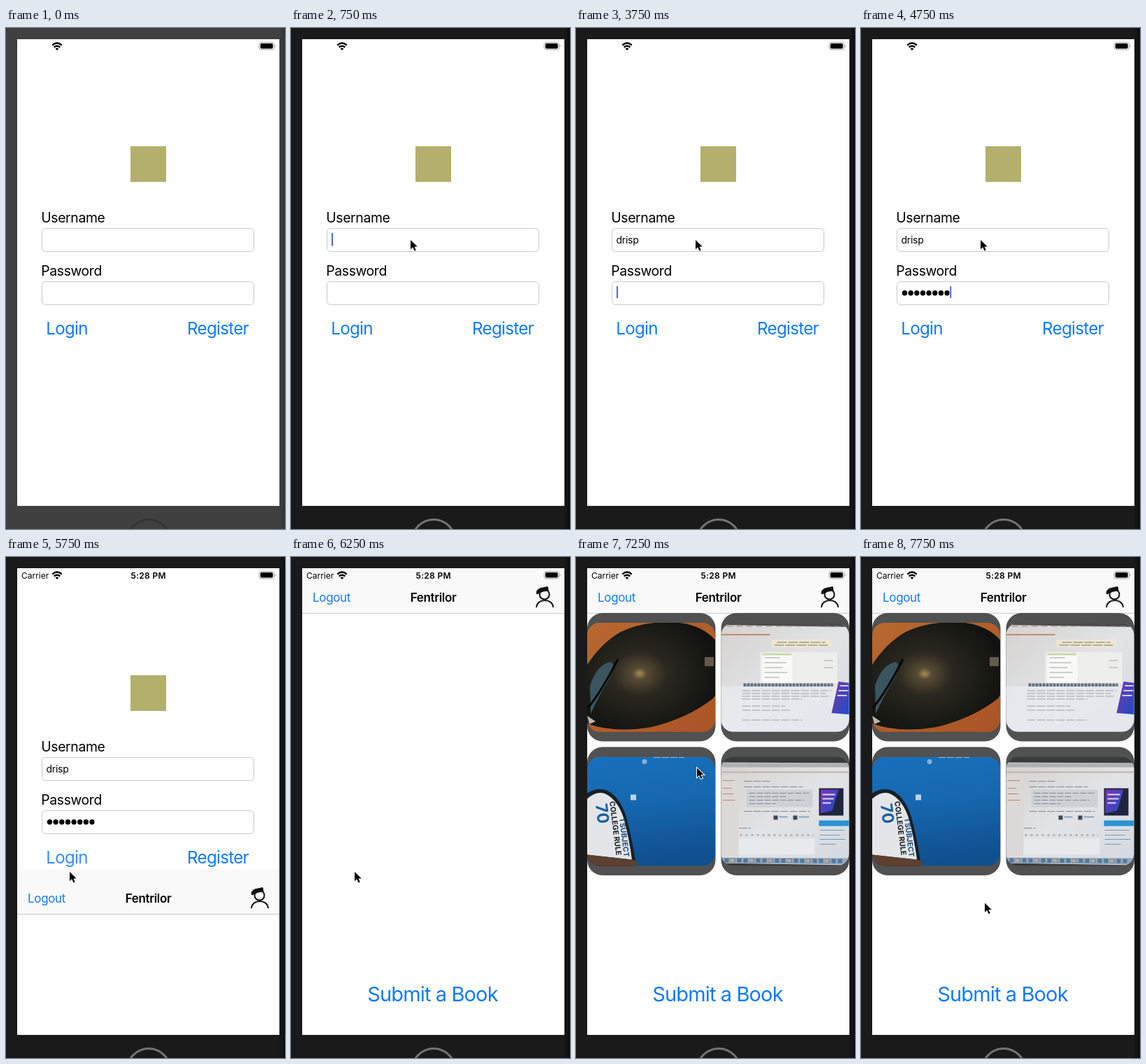
These frames come from a looping animation (399x716 px, 8000 ms). An HTML page:

```html
<!DOCTYPE html>
<html lang="en">
<head>
<meta charset="utf-8">
<title>Login flow</title>
<style>
html, body { margin: 0; width: 100%; height: 100%; overflow: hidden; background: #1a1a1a; }
svg { display: block; width: 399px; height: 716px; font-family: Inter, Roboto, sans-serif; }
.label { font-size: 19.4px; letter-spacing: -.02em; }
.button { font-size: 24.2px; letter-spacing: -.03em; fill: #0f7afc; text-anchor: middle; }
.submit { font-size: 29px; }
.nav { font-size: 17px; letter-spacing: -.02em; }
.center { text-anchor: middle; font-weight: 600; }
.small { font-size: 12px; }
.input { font-size: 14px; letter-spacing: -.02em; }
.field { fill: #fff; stroke: #c9c9c9; }
.caret { fill: #4967ee; }

/* All parts share one clock and hold their pose between keys. */
.anim { animation: 8s step-end infinite; }
.bezel { animation-name: bezel; }
.edge { animation-name: edge; }
.ring { animation-name: ring; }
.cursor { animation-name: cursor; }
.name-typing { animation-name: nameTyping; }
.name-caret { animation-name: nameCaret; }
.pass-typing { animation-name: passTyping; }
.pass-caret { animation-name: passCaret; }
.login { animation-name: login; }
.status { animation-name: status; }
.sheet { animation-name: sheet; }
.photos { animation-name: photos; }
.backdrop { animation-name: backdrop; }

@keyframes bezel { 0% { fill: #404040; } 6.25%, 100% { fill: #1a1a1a; } }
@keyframes edge { 0% { opacity: .4; } 6.25%, 100% { opacity: 1; } }
@keyframes ring { 0% { stroke: #343434; } 6.25%, 100% { stroke: #747474; } }
@keyframes cursor {
  0% { opacity: 0; transform: translate(215px, 400px); }
  3.125% { opacity: 1; transform: translate(192px, 345px); }
  6.25% { opacity: 1; transform: translate(170px, 301.5px); }
  65.625% { opacity: 1; transform: translate(120px, 396px); }
  68.75% { opacity: 1; transform: translate(90px, 448.5px); }
  81.25% { opacity: 1; transform: translate(117px, 450.5px); }
  84.375% { opacity: 1; transform: translate(148px, 400px); }
  87.5% { opacity: 1; transform: translate(168px, 345px); }
  90.625% { opacity: 1; transform: translate(172px, 300px); }
  93.75% { opacity: 1; transform: translate(172px, 275px); }
  96.875%, 100% { opacity: 1; transform: translate(176px, 493px); }
}
@keyframes nameTyping {
  0% { transform: none; }
  18.75% { transform: translateX(8.5px); }
  21.875% { transform: translateX(13.5px); }
  25% { transform: translateX(24px); }
  28.125%, 100% { transform: translateX(35px); }
}
@keyframes nameCaret { 0% { opacity: 0; } 9.375% { opacity: 1; } 34.375%, 100% { opacity: 0; } }
@keyframes passTyping {
  0% { transform: none; }
  50% { transform: translateX(17.3px); }
  53.125% { transform: translateX(34.6px); }
  56.25% { transform: translateX(51.9px); }
  59.375%, 100% { transform: translateX(69.2px); }
}
@keyframes passCaret {
  0% { opacity: 0; }
  37.5% { opacity: 1; }
  40.625% { opacity: 0; }
  46.875% { opacity: 1; }
  65.625%, 100% { opacity: 0; }
}
@keyframes login { 0% { opacity: 1; } 68.75%, 100% { opacity: .85; } }
@keyframes status { 0% { opacity: 0; } 71.875%, 100% { opacity: 1; } }
@keyframes sheet {
  0% { transform: translateY(668px); }
  71.875% { transform: translateY(430px); }
  75% { transform: translateY(9px); }
  78.125%, 100% { transform: none; }
}
@keyframes photos { 0% { opacity: 0; } 81.25%, 100% { opacity: 1; } }
@keyframes backdrop { 0% { fill: #fff; } 81.25% { fill: #fbfbfb; } 84.375%, 100% { fill: #fff; } }
</style>
</head>
<body>
<svg viewBox="0 0 399 716">
  <defs>
    <clipPath id="screen"><rect x="16" y="16" width="375" height="667"/></clipPath>
    <clipPath id="photo"><rect y="14" width="183" height="156" rx="18"/></clipPath>
    <linearGradient id="edge"><stop stop-opacity=".05"/><stop offset="1" stop-opacity=".5"/></linearGradient>
    <linearGradient id="wood" x2="1" y2="1"><stop stop-color="#b8682f"/><stop offset="1" stop-color="#a95425"/></linearGradient>
    <radialGradient id="shell" cx=".39" cy=".48" r=".6">
      <stop stop-color="#a88b58"/><stop offset=".09" stop-color="#574a34"/>
      <stop offset=".35" stop-color="#29271f"/><stop offset="1" stop-color="#11120f"/>
    </radialGradient>
    <linearGradient id="cover" x2=".15" y2="1"><stop stop-color="#1870ba"/><stop offset=".45" stop-color="#1668b0"/><stop offset="1" stop-color="#10508f"/></linearGradient>
    <linearGradient id="display" x2="1" y2="1"><stop stop-color="#d5d2d0"/><stop offset=".5" stop-color="#e2e3e6"/><stop offset="1" stop-color="#d3d9df"/></linearGradient>
    <linearGradient id="ad" x2="1" y2="1"><stop stop-color="#7a35b5"/><stop offset="1" stop-color="#1c4fc0"/></linearGradient>
    <rect id="card" width="183.5" height="183.5" rx="22" fill="#515151"/>
  </defs>

  <rect class="anim bezel" width="399" height="716"/>
  <rect class="anim edge" x="391" width="8" height="716" fill="url(#edge)"/>
  <circle class="anim ring" cx="204" cy="733.5" r="31" fill="none" stroke-width="3"/>

  <g clip-path="url(#screen)">
    <rect x="16" y="16" width="375" height="667" fill="#fff"/>
    <rect x="178" y="169" width="51" height="51" fill="#b3b06e"/>

    <text class="label" x="50.3" y="277.5">Username</text>
    <rect class="field" x="51.5" y="286.5" width="303" height="33" rx="5"/>
    <text class="input" x="57.5" y="308">drisp</text>
    <g clip-path="inset(0)">
      <g class="anim name-typing">
        <rect x="57.5" y="290" width="42" height="27" fill="#fff"/>
        <rect class="anim caret name-caret" x="58" y="293" width="2" height="18.5"/>
      </g>
    </g>

    <text class="label" x="50.3" y="353.5">Password</text>
    <rect class="field" x="51.5" y="362.5" width="303" height="33" rx="5"/>
    <path d="M62.5 378.7h62" fill="none" stroke="#000" stroke-width="7.4" stroke-linecap="round" stroke-dasharray="0 8.65"/>
    <g class="anim pass-typing">
      <rect x="57.5" y="366" width="76" height="26" fill="#fff"/>
      <rect class="anim caret pass-caret" x="58" y="369" width="2" height="17"/>
    </g>

    <text class="anim button login" x="87" y="438">Login</text>
    <text class="button" x="303" y="438">Register</text>

    <g class="anim sheet">
      <rect x="16" y="16" width="375" height="668" fill="#fff"/>
      <rect class="anim backdrop" x="16" y="80" width="375" height="392"/>
      <rect x="16" y="16" width="375" height="64" fill="#f9f9f9"/>
      <rect x="16" y="80" width="375" height="1" fill="#c9c9c9"/>
      <text class="nav" x="31" y="64" fill="#0f7afc">Logout</text>
      <text class="nav center" x="203.5" y="64">Fentrilor</text>
      <g fill="none" stroke="#111" stroke-width="2">
        <circle cx="362.5" cy="53.5" r="7"/>
        <path d="M351 72C352 58.5 374 58.5 375 72"/>
        <path d="M351 52Q351 45 360 44L367 42.5L368 48Q360 48 352 53Z" fill="#111" stroke-width="1"/>
      </g>

      <g class="anim photos">
        <g transform="translate(16 80)">
          <use href="#card"/>
          <g clip-path="url(#photo)">
            <rect y="14" width="183" height="156" fill="url(#wood)"/>
            <path d="M0 74Q20 43 48 27Q75 14 112 13Q165 12 188 45Q199 95 180 122Q145 150 92 163Q38 172 0 158Z" fill="url(#shell)"/>
            <path d="M4 104Q14 73 34 70Q42 76 31 95Q17 118 5 144Z" fill="#3a5560"/>
            <path d="M0 137Q20 113 44 66" fill="none" stroke="#070807" stroke-width="3"/>
            <path d="M0 147L12 155L3 159Z" fill="#b9b6ad"/>
            <rect x="168" y="63" width="13" height="13" fill="#625b4d"/>
          </g>
        </g>

        <g transform="translate(207.5 80)">
          <use href="#card"/>
          <g clip-path="url(#photo)">
            <rect y="15" width="184" height="154" fill="url(#display)"/>
            <path d="M0 15H184V20L0 17Z" fill="#4d4b4c"/>
            <path d="M8 19H184" stroke="#8e898c" stroke-dasharray="9 5"/>
            <path d="M0 31H70" stroke="#b98d70" stroke-width="2"/>
            <path d="M72 38H157V49H72Z" fill="#ede7d0"/>
            <path d="M80 42H149M76 46H153" stroke="#76736c" stroke-dasharray="14 2"/>
            <path d="M56 56H166V101H56Z" fill="#eeeeed"/>
            <path d="M59 57H102V100H59Z" fill="#f9f9f7"/>
            <path d="M62 64H84M62 71H93M62 78H88M62 85H95M62 92H83M147 68H160M147 78H160" stroke="#a3a39f"/>
            <path d="M59 59H101" stroke="#cbd9a8" stroke-width="3"/>
            <path d="M32 103H160" stroke="#626e80" stroke-width="5" stroke-dasharray="4 1"/>
            <path d="M0 105H184V170H0Z" fill="#e8ebef" opacity=".8"/>
            <path d="M30 111H158M30 115H150M30 119H155M30 123H116M30 133H92M30 139H99M30 153H116" stroke="#9ca1a8" stroke-dasharray="12 2"/>
            <path d="M168 98L184 100V145L158 143Z" fill="url(#ad)"/>
            <path d="M170 104H182M168 111H182M166 118H180" stroke="#c9d3fa" stroke-width="2"/>
          </g>
        </g>

        <g transform="translate(16 271.5)">
          <use href="#card"/>
          <g clip-path="url(#photo)">
            <rect y="14" width="183" height="156" fill="url(#cover)"/>
            <path d="M0 66Q14 57 28 62Q46 70 56 100Q64 130 69 163L66 171H0Z" fill="#17202b"/>
            <path d="M0 74Q14 62 26 67Q43 75 52 101Q60 130 64 161L0 154Z" fill="#e3e5e8"/>
            <path d="M0 154L64 161L71 163V171H0Z" fill="#5d4032"/>
            <circle cx="82" cy="21" r="3.5" fill="#8ab0d2"/>
            <rect x="62" y="68" width="8" height="8" fill="#bcd3e8"/>
            <path d="M95 15H139" stroke="#9bbbd7" stroke-dasharray="10 2"/>
            <g font-weight="700">
              <text transform="translate(12 82) rotate(83)" font-size="23" fill="#1b5f9f">70</text>
              <text transform="translate(32 78) rotate(83)" font-size="10.5" fill="#151c24">COLLEGE RULE</text>
              <text transform="translate(46 102) rotate(83)" font-size="10.5" fill="#1c4c7e">1 SUBJECT</text>
            </g>
          </g>
        </g>

        <g transform="translate(207.5 271.5)">
          <use href="#card"/>
          <g clip-path="url(#photo)">
            <rect y="14" width="184" height="156" fill="#393a3b"/>
            <path d="M0 22L184 23V169L0 166Z" fill="url(#display)"/>
            <path d="M0 23H184V29H0Z" fill="#aeb0b2"/>
            <path d="M0 36H184" stroke="#c4b3a8" stroke-width="2"/>
            <path d="M0 41H25V156H0Z" fill="#dcd8d5"/>
            <path d="M2 48H20M2 59H15M2 67H18M2 76H20" stroke="#b98779"/>
            <path d="M33 49H72M33 57H117M33 92H127M26 116H42" stroke="#83878d" stroke-dasharray="11 2"/>
            <path d="M36 61H131V86H36Z" fill="#cdd1d5"/>
            <path d="M40 66H126M40 71H94M40 76H119M40 81H78" stroke="#858c94" stroke-dasharray="9 2"/>
            <path d="M75 101h6M103 101h6" stroke="#3f4851" stroke-width="6"/>
            <path d="M83 100H95M111 100H126" stroke="#8ba4bd" stroke-width="2"/>
            <path d="M27 126H132" stroke="#9ba0a5" stroke-width="2" stroke-dasharray="3 5"/>
            <path d="M25 131H134V154H25Z" fill="#e6eaed"/>
            <path d="M140 59H175V98H140Z" fill="#21243e"/>
            <path d="M142 61H168L159 91L142 95Z" fill="url(#ad)"/>
            <path d="M145 68H163M145 74H161M145 80H157" stroke="#e2d8f5" stroke-width="2"/>
            <path d="M140 109H184" stroke="#2793d5" stroke-width="8"/>
            <path d="M141 119H176M141 126H170M141 132H178M141 139H164" stroke="#759abb"/>
            <path d="M0 158L184 159V168L0 166Z" fill="#8fa8bb"/>
            <path d="M5 162L176 163" stroke="#55779c" stroke-width="6" stroke-dasharray="6 3"/>
            <path d="M14 162L170 163" stroke="#c4a894" stroke-width="5" stroke-dasharray="5 22"/>
          </g>
        </g>
      </g>
      <text class="button submit" x="202.5" y="635">Submit a Book</text>
    </g>

    <g class="anim status small">
      <text x="22" y="30.5">Carrier</text>
      <text class="center" x="203.7" y="30.5" letter-spacing=".3">5:28 PM</text>
    </g>
    <g fill="none" stroke="#000" stroke-width="2.4">
      <path d="M66.3 24.6Q73 18.6 79.7 24.6M68.7 27.5Q73 23.9 77.3 27.5"/>
      <path d="M70.6 29.5Q73 27.6 75.4 29.5L73 32Z" fill="#000" stroke="none"/>
    </g>
    <rect x="362" y="20.5" width="21.5" height="10.5" rx="3" fill="none" stroke="#a5a5a5"/>
    <rect x="363.7" y="22" width="18" height="7.5" rx="1.7"/>
    <path d="M384.7 24Q387 25.7 384.7 27.5Z" fill="#a5a5a5"/>
  </g>

  <path class="anim cursor" d="M1 1.5V14.7L4.2 11.7L6.5 16.9L8.7 15.9L6.5 10.9H10.8Z" stroke="#fff" stroke-width="2" paint-order="stroke"/>
</svg>
</body>
</html>
```
